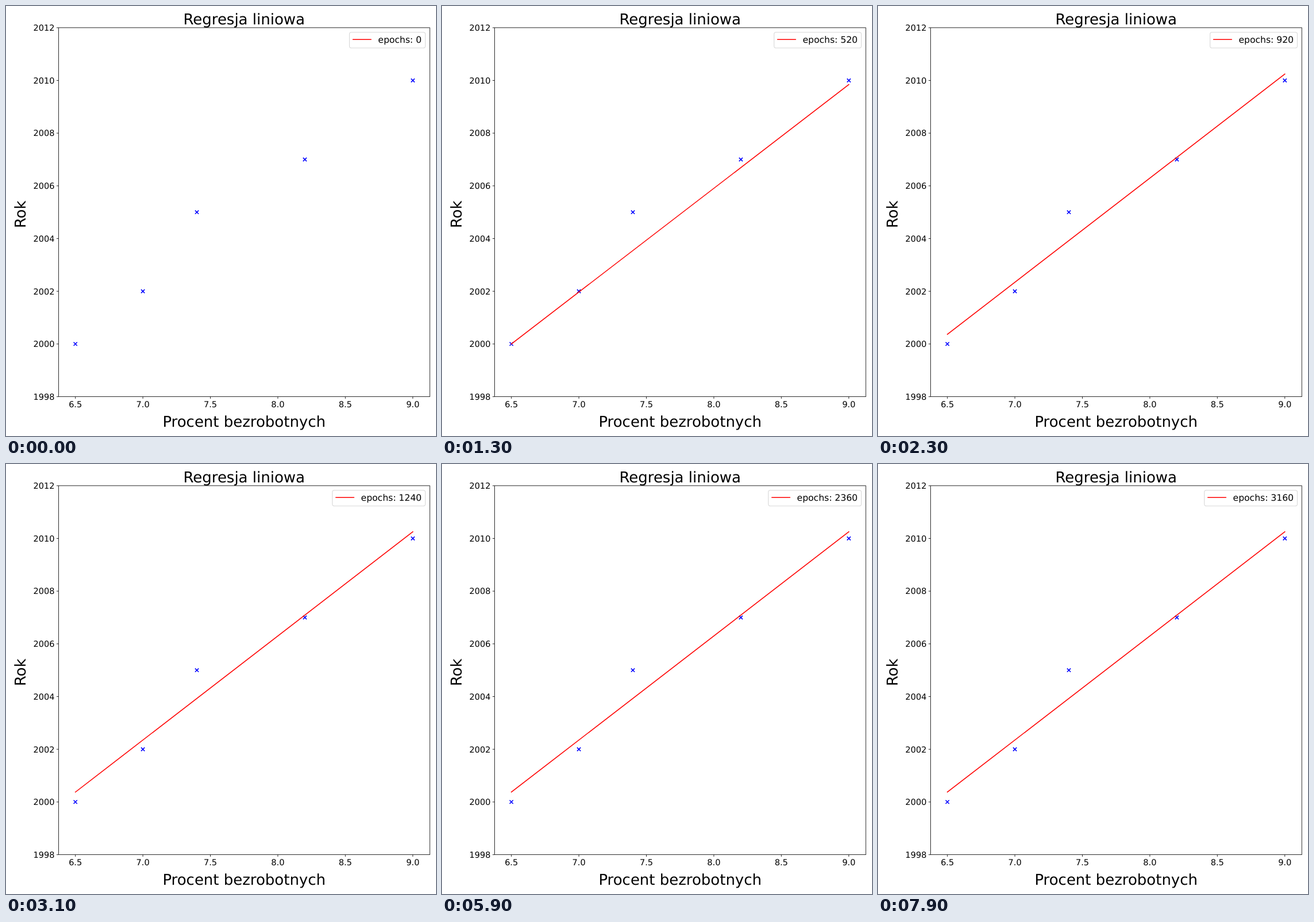
Write an HTML page that moves like this. It is 748 px wide and 748 px high and loops after 8000 ms.

```html
<!DOCTYPE html>
<html lang="pl">
<head>
<meta charset="utf-8">
<title>Regresja liniowa</title>
<style>
  html, body { margin: 0; width: 100%; height: 100%; overflow: hidden; background: #fff; }
  svg { display: block; width: 748px; height: 748px; }
  text { font-family: "DejaVu Sans", sans-serif; fill: #000; text-rendering: geometricPrecision; }
</style>
</head>
<body>
<svg id="plot" viewBox="0 0 748 748">
  <clipPath id="area"><rect x="91.6" y="37.8" width="645.6" height="641.8"/></clipPath>
</svg>
<script>
const LOOP = 8000, STEP = 100, EPOCHS_PER_STEP = 40;
const BOX = { left: 91.6, right: 737.2, top: 37.8, bottom: 679.6 };
const RED = '#f00', LINE = 1.56, THIN = 0.83;
const POINTS = [[6.5, 2000], [7, 2002], [7.4, 2005], [8.2, 2007], [9, 2010]];

const plot = document.getElementById('plot');
const px = x => 120.7 + (x - 6.5) * 234.8;
const py = y => BOX.bottom - (y - 1998) * (BOX.bottom - BOX.top) / 14;

function add(tag, attrs, content = '') {
  const el = document.createElementNS('http://www.w3.org/2000/svg', tag);
  set(el, attrs);
  el.textContent = content;
  return plot.appendChild(el);
}
function set(el, attrs) {
  for (const key in attrs) el.setAttribute(key, attrs[key]);
}
function label(content, x, y, size, anchor = 'middle', extra = {}) {
  return add('text', { x, y, 'font-size': size, 'text-anchor': anchor, ...extra }, content);
}
function stroke(d, color, width, extra = {}) {
  return add('path', { d, stroke: color, 'stroke-width': width, fill: 'none', ...extra });
}

// Axes and ticks
for (let x = 6.5; x <= 9; x += 0.5) {
  stroke(`M${px(x)} ${BOX.bottom}v3.64`, '#000', THIN);
  label(x.toFixed(1), px(x), 698, 14.54);
}
for (let y = 1998; y <= 2012; y += 2) {
  stroke(`M${BOX.left} ${py(y)}h-3.64`, '#000', THIN);
  label(y, 84.6, py(y) + 5.3, 14.54, 'end');
}
label('Regresja liniowa', 414.2, 31.5, 25.97);
label('Procent bezrobotnych', 414.2, 731.5, 25.97);
label('Rok', 0, 0, 25.97, 'start', { transform: 'translate(34 386.3) rotate(-90)' });

for (const [x, y] of POINTS) {
  stroke(`M${px(x) - 3.1} ${py(y) - 3.1}l6.2 6.2m0 -6.2l-6.2 6.2`, '#00f', LINE);
}
const fit = stroke('', RED, LINE, { 'clip-path': 'url(#area)', 'stroke-linecap': 'square' });
add('rect', {
  x: BOX.left, y: BOX.top, width: BOX.right - BOX.left, height: BOX.bottom - BOX.top,
  fill: 'none', stroke: '#000', 'stroke-width': THIN
});

// Legend
const EM = 15.58, TEXT_END = 723;
const frame = add('rect', {
  y: 45.7, height: 27.2, rx: 3.1, fill: '#fff', 'fill-opacity': 0.8,
  stroke: '#ccc', 'stroke-opacity': 0.8, 'stroke-width': 1.04
});
const key = stroke('', RED, LINE, { 'stroke-linecap': 'square' });
const counter = label('', 0, 63.6, EM, 'start');

function leastSquares(points) {
  const mean = i => points.reduce((s, p) => s + p[i], 0) / points.length;
  const mx = mean(0), my = mean(1);
  let sxx = 0, sxy = 0;
  for (const [x, y] of points) {
    sxx += (x - mx) ** 2;
    sxy += (x - mx) * (y - my);
  }
  return x => my + (x - mx) * sxy / sxx;
}
const best = leastSquares(POINTS);

function draw(step) {
  const epochs = step * EPOCHS_PER_STEP;

  // The remaining error shrinks by a constant factor per step
  const rest = 0.688 ** (step - 9);
  const y1 = py(best(6.5) - 1.665 * rest);
  const y2 = py(best(9) - 1.825 * rest);
  set(fit, { d: `M${px(6.5)} ${y1}L${px(9)} ${y2}` });

  const start = TEXT_END - (4.222 + 0.636 * String(epochs).length) * EM;
  const keyStart = start - 2.8 * EM;
  const left = keyStart - 0.4 * EM;
  counter.textContent = `epochs: ${epochs}`;
  set(counter, { x: start });
  set(key, { d: `M${keyStart} 58.3h${2 * EM}` });
  set(frame, { x: left, width: 729.4 - left });
}

let shown = -1;
const origin = performance.now();
function tick() {
  const step = Math.floor(((performance.now() - origin) % LOOP) / STEP);
  if (step !== shown) draw(shown = step);
  requestAnimationFrame(tick);
}
tick();
</script>
</body>
</html>
```
